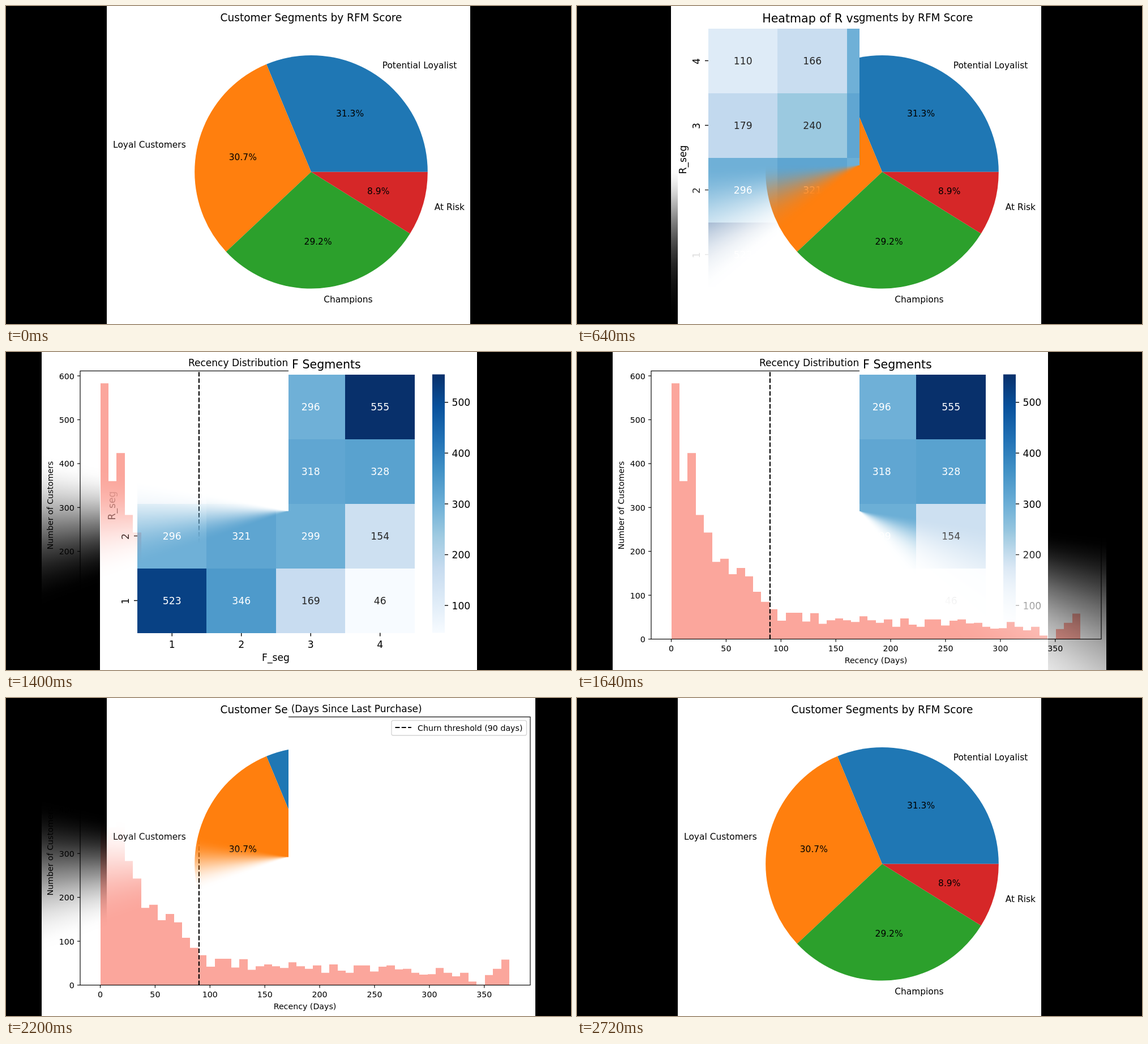
Recreate the animation shown at these times as an HTML page with a canvas. Size 998 by 561 pixels, loop 3200 ms.

```html
<!DOCTYPE html>
<html lang="en">
<head>
<meta charset="utf-8">
<title>Customer charts</title>
<style>
  html, body { margin: 0; width: 100%; height: 100%; overflow: hidden; background: #000; }
  canvas { display: block; }
</style>
</head>
<body>
<canvas id="stage" width="998" height="561"></canvas>
<script>
const W = 998, H = 561, TAU = Math.PI * 2;
const LOOP = 3200, HOLD = 400, WIPE = 800, STEP = 40;
const stage = document.getElementById('stage').getContext('2d');

function newLayer() {
  const canvas = document.createElement('canvas');
  canvas.width = W;
  canvas.height = H;
  return canvas.getContext('2d');
}

// A black slide with a white panel between two x positions.
function slide(left, right, draw) {
  const c = newLayer();
  c.fillStyle = '#000';
  c.fillRect(0, 0, W, H);
  c.fillStyle = '#fff';
  c.fillRect(left, 0, right - left, H);
  draw(c);
  return c.canvas;
}

// Text whose capitals are vertically centred on y.
function text(c, str, x, y, size, { align = 'center', color = '#000', turn = false } = {}) {
  c.save();
  c.translate(x, y);
  if (turn) c.rotate(-Math.PI / 2);
  c.font = `${size}px "DejaVu Sans", sans-serif`;
  c.textAlign = align;
  c.fillStyle = color;
  c.fillText(str, 0, size * 0.364);
  c.restore();
}

function line(c, x1, y1, x2, y2, width, dash = []) {
  c.strokeStyle = '#000';
  c.lineWidth = width;
  c.setLineDash(dash);
  c.beginPath();
  c.moveTo(x1, y1);
  c.lineTo(x2, y2);
  c.stroke();
  c.setLineDash([]);
}

function drawPie(c) {
  const cx = 539, cy = 292.7, r = 205.8, size = 15.45;
  const slices = [
    ['Potential Loyalist', 31.27, '#1f77b4', 'left'],
    ['Loyal Customers', 30.71, '#ff7f0e', 'right'],
    ['Champions', 29.16, '#2ca02c', 'left'],
    ['At Risk', 8.86, '#d62728', 'left']
  ];
  text(c, 'Customer Segments by RFM Score', cx, 20, 18.55);
  let from = 0;
  for (const [label, share, color, align] of slices) {
    const to = from + share / 100 * TAU, mid = (from + to) / 2;
    const at = k => [cx + k * r * Math.cos(mid), cy - k * r * Math.sin(mid) - 0.4];
    c.fillStyle = color;
    c.beginPath();
    c.moveTo(cx, cy);
    c.arc(cx, cy, r, -from, -to, true);
    c.fill();
    text(c, label, ...at(1.1), size, { align });
    text(c, share.toFixed(1) + '%', ...at(0.6), size);
    from = to;
  }
}

function drawHeatmap(c) {
  const left = 232, top = 39.5, cellW = 122.5, cellH = 114, size = 17.2;
  const bottom = top + 4 * cellH, min = 46, max = 555;
  const blues = ['f7fbff', 'deebf7', 'c6dbef', '9ecae1', '6baed6', '4292c6', '2171b5', '08519c', '08306b'];
  const rows = [[110, 166, 296, 555], [179, 240, 318, 328], [296, 321, 299, 154], [523, 346, 169, 46]];

  const shade = v => {
    const p = (v - min) / (max - min) * 8, i = Math.min(7, Math.floor(p));
    const rgb = [0, 2, 4].map(k => {
      const [a, b] = [blues[i], blues[i + 1]].map(h => parseInt(h.slice(k, k + 2), 16));
      return Math.round(a + (b - a) * (p - i));
    });
    return `rgb(${rgb})`;
  };

  text(c, 'Heatmap of R vs F Segments', 477, 21.8, 20.6);
  rows.forEach((row, j) => {
    const y = top + j * cellH, y0 = Math.round(y), y1 = Math.round(y + cellH);
    row.forEach((v, i) => {
      const x = left + i * cellW, x0 = Math.floor(x), x1 = Math.floor(x + cellW);
      c.fillStyle = shade(v);
      c.fillRect(x0, y0, x1 - x0, y1 - y0);
      text(c, v, x + cellW / 2, y + cellH / 2 + 0.3, size, { color: v > 290 ? '#fff' : '#262626' });
    });
    const mx = left + (j + 0.5) * cellW, my = y + cellH / 2;
    line(c, left - 6, my, left, my, 1.4);
    line(c, mx, bottom, mx, bottom + 6, 1.4);
    text(c, 4 - j, 211, my + 1, size, { turn: true });
    text(c, j + 1, mx, 516, size);
  });
  text(c, 'F_seg', 476.5, 539, size);
  text(c, 'R_seg', 186.5, 271, size, { turn: true });

  const bar = c.createLinearGradient(0, bottom, 0, top);
  blues.forEach((h, i) => bar.addColorStop(i / 8, '#' + h));
  c.fillStyle = bar;
  c.fillRect(753, top, 22, bottom - top);
  for (let v = 100; v <= 500; v += 100) {
    const y = bottom - (v - min) / (max - min) * (bottom - top);
    line(c, 775, y, 781, y, 1.4);
    text(c, v, 787.5, y + 0.4, size, { align: 'left' });
  }
}

function drawHistogram(c) {
  const left = 131, right = 926, top = 33.4, bottom = 506.5, size = 14.2;
  const x0 = 166.5, binW = 14.45, perDay = 1.938, perCount = 0.774, dash = [7.9, 3.4];
  const counts = [
    583, 360, 424, 283, 243, 176, 183, 148, 162, 143, 108, 85, 68, 42, 60, 60, 40,
    59, 35, 43, 47, 43, 39, 52, 43, 37, 45, 28, 47, 33, 28, 45, 45, 31,
    42, 45, 36, 37, 28, 24, 25, 39, 28, 20, 28, 8, 1, 23, 37, 58
  ];
  c.fillStyle = '#fba69c';
  c.beginPath();
  counts.forEach((n, i) => {
    const a = Math.round(x0 + i * binW), b = Math.round(x0 + (i + 1) * binW);
    c.rect(a, bottom - n * perCount, b - a, n * perCount);
  });
  c.fill();

  const limit = x0 + 90 * perDay;
  line(c, limit, bottom, limit, top, 2.1, dash);
  c.lineWidth = 1.15;
  c.strokeRect(left, top, right - left, bottom - top);

  for (let d = 0; d <= 350; d += 50) {
    const x = x0 + d * perDay;
    line(c, x, bottom, x, bottom + 5, 1.15);
    text(c, d, x, 523.3, size);
  }
  for (let n = 0; n <= 600; n += 100) {
    const y = bottom - n * perCount;
    line(c, left - 5, y, left, y, 1.15);
    text(c, n, 120.8, y + 0.4, size, { align: 'right' });
  }
  text(c, 'Recency Distribution (Days Since Last Purchase)', 528.3, 18.3, 17.05);
  text(c, 'Recency (Days)', 528, 544, size);
  text(c, 'Number of Customers', 78, 270.5, size, { turn: true });

  c.strokeStyle = '#d4d4d4';
  c.lineWidth = 1.3;
  c.beginPath();
  c.roundRect(681, 39.7, 238.5, 26.3, 3);
  c.stroke();
  line(c, 687.5, 52, 716, 52, 2.1, dash);
  text(c, 'Churn threshold (90 days)', 727, 52.4, size, { align: 'left' });
}

const slides = [
  slide(178, 820, drawPie),
  slide(166, 832, drawHeatmap),
  slide(63, 935, drawHistogram)
];
const incoming = newLayer();

// Soft counterclockwise sweep from the top, stretched to the stage's proportions.
function sweepMask(c, progress) {
  const edge = (progress * 2.5 - 0.25) * Math.PI, stops = 240;
  const mask = c.createConicGradient(-Math.PI / 2, 0, 0);
  for (let i = 0; i <= stops; i++) {
    const s = Math.min(1, Math.max(0, TAU * (1 - i / stops) - edge));
    mask.addColorStop(i / stops, `rgba(0,0,0,${1 - s * s * (3 - 2 * s)})`);
  }
  c.save();
  c.globalCompositeOperation = 'destination-in';
  c.translate(W / 2, H / 2);
  c.scale(W / 2, H / 2);
  c.fillStyle = mask;
  c.fillRect(-1, -1, 2, 2);
  c.restore();
}

function render() {
  const t = Math.floor(performance.now() % LOOP / STEP) * STEP - HOLD;
  const index = Math.floor(t / WIPE);
  if (index < 0 || index > 2) {
    stage.drawImage(slides[0], 0, 0);
  } else {
    incoming.clearRect(0, 0, W, H);
    incoming.drawImage(slides[(index + 1) % 3], 0, 0);
    sweepMask(incoming, t % WIPE / WIPE);
    stage.drawImage(slides[index], 0, 0);
    stage.drawImage(incoming.canvas, 0, 0);
  }
  requestAnimationFrame(render);
}
render();
</script>
</body>
</html>
```
